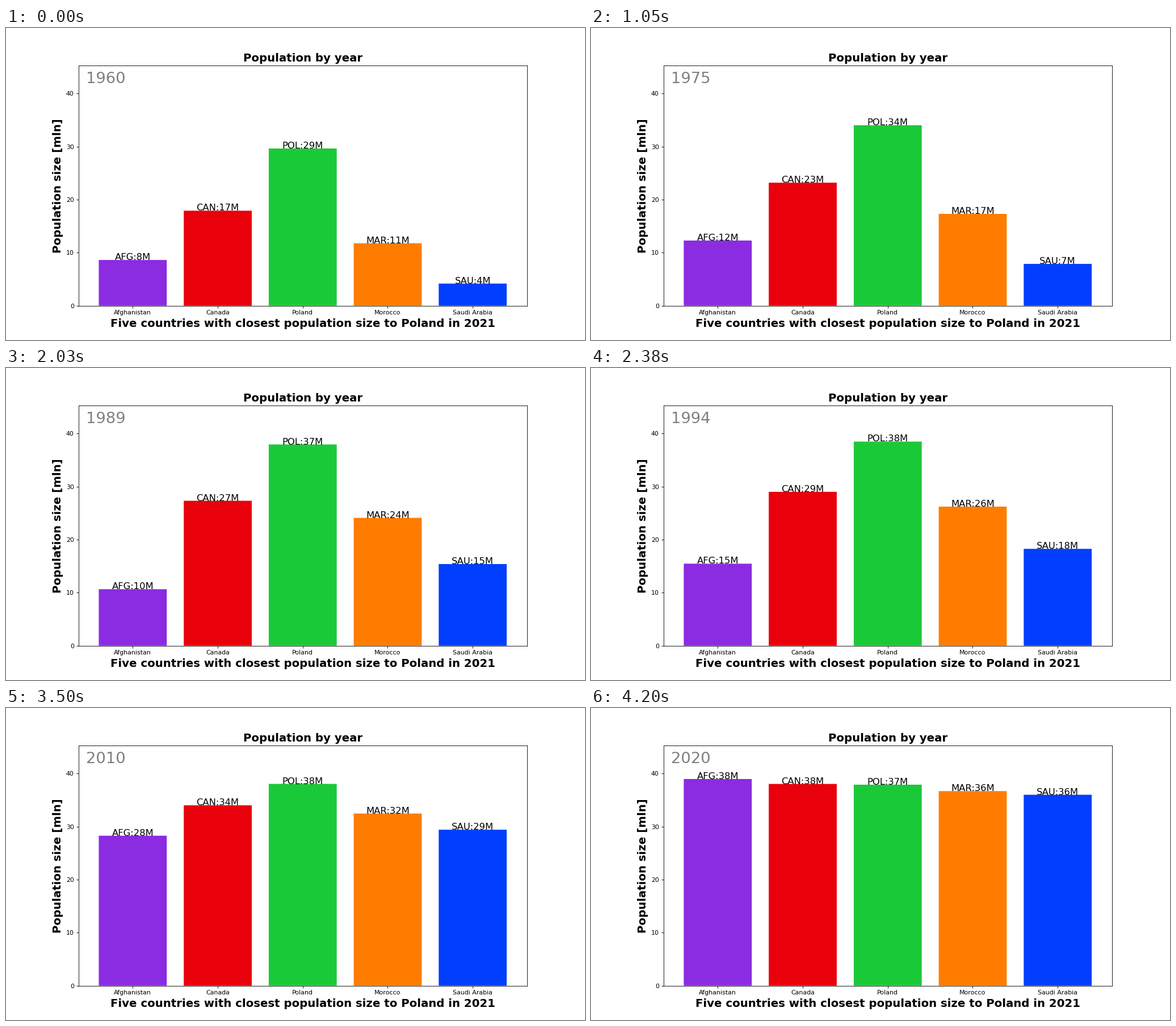
A matplotlib script for the animation above (4270 ms loop, 1020x549 px).

```python
import numpy as np
import matplotlib.pyplot as plt
from matplotlib.animation import FuncAnimation

W, H, DPI = 1020, 549, 78.8
YEARS = np.arange(1960, 2021)

# Name, code, colour and turning points of the population curve (millions)
COUNTRIES = [
    ("Afghanistan", "AFG", "#8b2be2",
     {1960: 8.62, 1970: 10.75, 1979: 12.99, 1983: 9.95, 1985: 10.5, 1991: 10.75,
      1992: 12.06, 1994: 15.46, 1999: 19.26, 2001: 19.69, 2003: 22.7,
      2008: 26.43, 2020: 38.97}),
    ("Canada", "CAN", "#e8000b",
     {1960: 17.91, 1966: 20.05, 1970: 21.32, 1971: 21.96, 1978: 23.96,
      1985: 25.84, 1990: 27.69, 1994: 29.01, 2000: 30.69, 2010: 34.01,
      2020: 38.04}),
    ("Poland", "POL", "#1ac938",
     {1960: 29.64, 1966: 31.68, 1971: 32.78, 1975: 34.02, 1984: 36.88,
      1988: 37.82, 1998: 38.66, 1999: 38.66, 2000: 38.26, 2010: 38.05,
      2015: 37.99, 2020: 37.9}),
    ("Morocco", "MAR", "#ff7c00",
     {1960: 11.77, 1970: 15.27, 1975: 17.31, 1984: 21.83, 1994: 26.22,
      2003: 29.65, 2010: 32.46, 2020: 36.69}),
    ("Saudi Arabia", "SAU", "#023eff",
     {1960: 4.17, 1970: 6.11, 1975: 7.88, 1984: 12.27, 1990: 16.0, 2000: 21.55,
      2005: 24.4, 2010: 29.41, 2020: 36.0}),
]


def curve(points):
    """Sample a monotone cubic through the turning points, once per year."""
    x, y = np.array(list(points.items())).T
    h = np.diff(x)
    s = np.diff(y) / h
    a, b = s[:-1], s[1:]
    same = a * b > 0
    inner = np.where(same, 2 * a * b / np.where(same, a + b, 1), 0)
    m = np.concatenate([s[:1], inner, s[-1:]])
    k = np.clip(np.searchsorted(x, YEARS, side="right") - 1, 0, len(h) - 1)
    t = (YEARS - x[k]) / h[k]
    bend = t * (1 - t) ** 2 * (m[k] - s[k]) - t ** 2 * (1 - t) * (m[k + 1] - s[k])
    return y[k] + h[k] * (t * s[k] + bend)


names, codes, colors, points = zip(*COUNTRIES)
sizes = np.array([curve(p) for p in points])

plt.rcParams["font.family"] = "DejaVu Sans"
# The tiny margin keeps the pixel size from rounding down
fig, ax = plt.subplots(figsize=((W + 1e-6) / DPI, (H + 1e-6) / DPI), dpi=DPI)
heading = dict(fontsize=18, fontweight="bold")

bars = ax.bar(names, sizes[:, 0], color=colors, linewidth=0, snap=False)
labels = [ax.text(i, 0, "", ha="center", fontsize=15) for i in range(len(names))]
year_text = ax.text(-0.55, 42, "", fontsize=25, color="gray")

ax.set_xlim(-0.64, 4.64)
ax.set_ylim(0, 45.3)
ax.set_yticks(range(0, 41, 10))
ax.set_title("Population by year", **heading)
ax.set_xlabel("Five countries with closest population size to Poland in 2021", **heading)
ax.set_ylabel("Population size [mln]", **heading)


def update(frame):
    for bar, label, code, size in zip(bars, labels, codes, sizes[:, frame]):
        bar.set_height(size)
        label.set_y(size)
        label.set_text(f"{code}:{int(size)}M")
    year_text.set_text(str(YEARS[frame]))
    return [*bars, *labels, year_text]


anim = FuncAnimation(fig, update, frames=len(YEARS), interval=70,
                     repeat=True, repeat_delay=0, blit=False)
plt.show()
```
